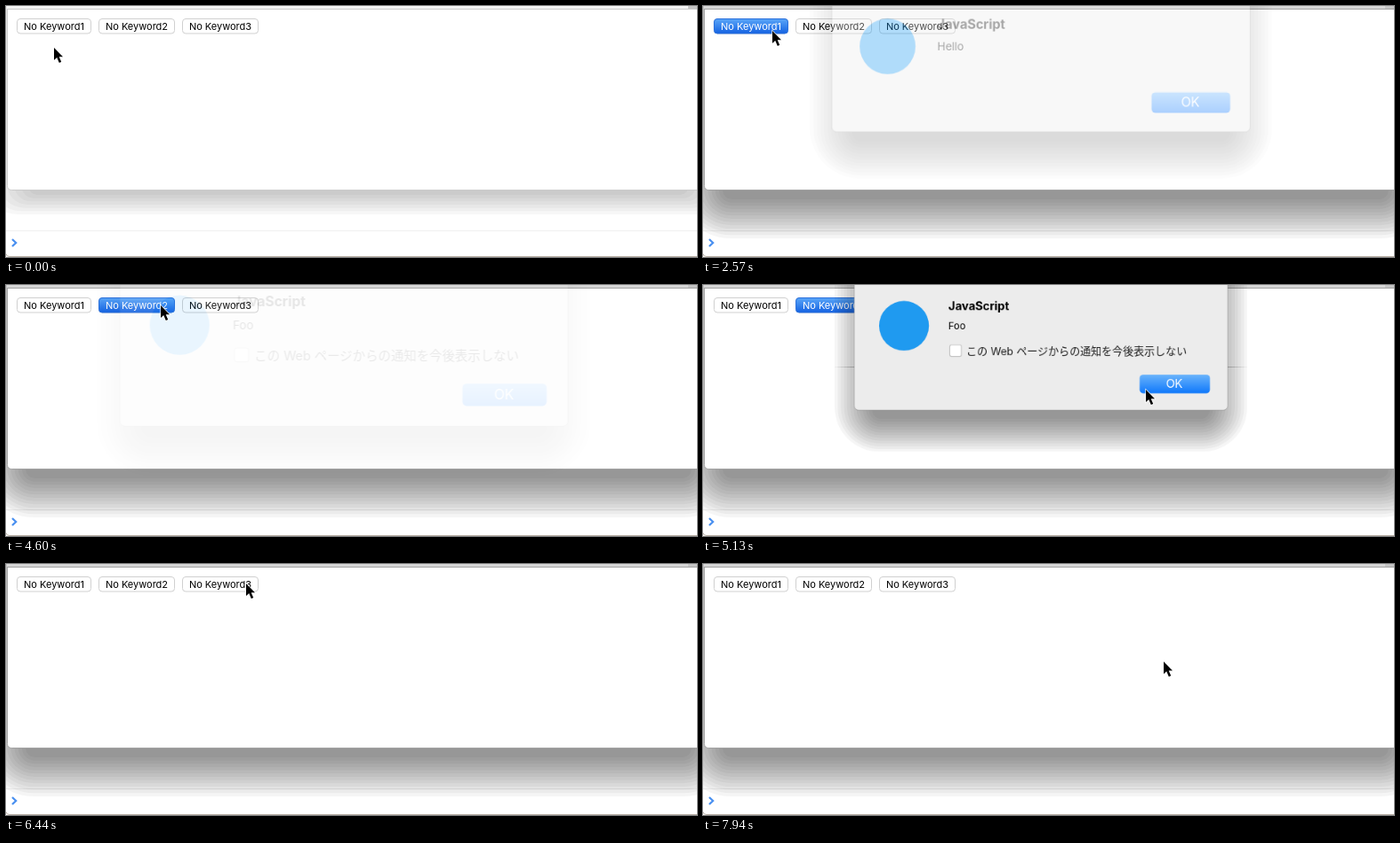
Animation of 777x283 px, one loop 8000 ms. Source, as an HTML page:

```html
<!DOCTYPE html>
<html lang="ja">
<head>
<meta charset="utf-8">
<title>Alert buttons</title>
<style>
  html, body { margin: 0; width: 100%; height: 100%; overflow: hidden; background: #fff; }
  svg { display: block; font: 11px Inter, "Noto Sans CJK JP", sans-serif; }
  .title { font-size: 13px; font-weight: 700; }
  .label { font-size: 12px; fill: #222; }
  .ok { font-size: 13px; fill: #fff; }
  .mid { text-anchor: middle; }
  .dialog { transform-origin: 380px 50px; }
</style>
</head>
<body>
<svg id="stage" width="777" height="283" viewBox="0 0 777 283"></svg>
<script>
const LOOP = 8000, TICK = 88;
const mix = (a, b, u) => a + (b - a) * u;
const smooth = u => u * u * (3 - 2 * u);

// Banded drop shadow: nested translucent rounded boxes.
function shadow(left, right, bottom, { layers, alpha, inset, spread, near, drop, radius }) {
  return Array.from({ length: layers }, (_, i) => {
    const u = i / (layers - 1);
    const dx = mix(inset, -spread, u);
    const base = bottom + mix(near, drop, u);
    return `<rect x="${left + dx}" y="-120" width="${right - left - 2 * dx}" height="${base + 120}"
      rx="${mix(10, radius, u)}" fill-opacity="${alpha}"/>`;
  }).join('');
}

const SHADOWS = {
  idle: { layers: 7, alpha: .033, inset: 24, spread: 24, near: 6, drop: 28, radius: 36 },
  active: { layers: 13, alpha: .039, inset: 21, spread: 30, near: 11, drop: 55, radius: 60 },
  dialog: { layers: 13, alpha: .039, inset: 20, spread: 22, near: 10, drop: 47, radius: 50 }
};

function browser(id, strip, edge) {
  return `<g id="${id}">
    ${shadow(1, 792, 207, SHADOWS[id])}
    <path d="M1.5 0V202.500Q1.500 207.500 6.500 207.500H780V0Z" fill="#fff" stroke="${edge}"/>
    <rect x="1" width="767" height="3" fill="${strip}"/>
    <rect x="767" width="10" height="3" fill="#c4c4c4"/>
    <rect x="1" y="3" width="776" height="1" fill="${edge}"/>
  </g>`;
}

const BUTTONS = [[12, 84], [104, 86], [198, 86]];

function button([x, width], index) {
  const face = (fill, edge, ink) => `
    <rect x="${x + .5}" y="14.500" width="${width - 1}" height="16.500" rx="3.500" fill="${fill}" stroke="${edge}"/>
    <text class="mid" x="${x + width / 2}" y="27" fill="${ink}">No Keyword${index + 1}</text>`;
  return face('#fff', '#d0d0d0', '#000') +
    `<g id="press${index}">${face('url(#pressed)', '#2a70dc', '#fff')}</g>`;
}

function dialog({ message, bottom, checkbox }, index) {
  const okTop = bottom - 40;
  const option = `<rect x="277.500" y="67.500" width="13" height="13" rx="2" fill="#fff" stroke="#c4c4c4"/>
    <text class="label" x="296" y="79">この Web ページからの通知を今後表示しない</text>`;
  return `<g class="dialog" id="dialog${index}">
    ${shadow(170, 590, bottom, SHADOWS.dialog)}
    <rect x="170" y="-41" width="420" height="${bottom + 41}" rx="5" fill="#ececec" stroke="#000" stroke-opacity=".22" stroke-width=".8"/>
    <circle cx="226" cy="46" r="28" fill="#1f9af0"/>
    <text class="title" x="276" y="28">JavaScript</text>
    <text x="276" y="50">${message}</text>
    ${checkbox ? option : ''}
    <rect x="491" y="${okTop}" width="79" height="21" rx="4" fill="url(#accent)"/>
    <text class="ok mid" x="530" y="${okTop + 15}">OK</text>
  </g>`;
}

const ALERTS = [
  { message: 'Hello', bottom: 132, press: 2230, open: 2400, close: 3280 },
  { message: 'Foo', bottom: 141, press: 4340, open: 4520, close: 5400, checkbox: true },
  { message: 'Bar', bottom: 141, press: 6530, open: 6700, close: 7590, checkbox: true }
];

const gradient = (id, top, bottom) => `<linearGradient id="${id}" x2="0" y2="1">
  <stop stop-color="${top}"/><stop offset="1" stop-color="${bottom}"/></linearGradient>`;

document.getElementById('stage').innerHTML = `
  <defs>${gradient('pressed', '#5aa6f8', '#1462e2')}${gradient('accent', '#6ab4fb', '#0f78fb')}</defs>
  <rect width="777" height="283" fill="#fff"/>
  ${browser('idle', '#f5f5f5', '#cbcbcb')}
  ${browser('active', '#d6d6d6', '#a2a2a2')}
  <rect y="253" width="777" height="1" fill-opacity=".06"/>
  <path d="M7 263l4.200 4-4.200 4" fill="none" stroke="#4a90f0" stroke-width="2.200"/>
  <path d="M0 279.500Q.5 282.500 4 282.500H777" fill="none" stroke="#b8afa5"/>
  ${BUTTONS.map(button).join('')}
  ${ALERTS.map(dialog).join('')}
  <path id="cursor" d="M0 0V14L3.200 11 5.800 17 8.200 16 5.700 10.200H10Z" stroke="#fff" stroke-width="1.200" paint-order="stroke"/>`;

// Holds each value until the next listed time.
function play(id, steps) {
  const frames = steps.map(([time, style]) => ({ offset: time / LOOP, easing: 'step-end', ...style }));
  document.getElementById(id).animate(frames, { duration: LOOP, iterations: Infinity });
}

const show = opacity => ({ opacity });

function span(id, from, to) {
  play(id, [[0, show(0)], [from, show(1)], [to, show(0)]]);
}

play('idle', [[0, show(1)], [1700, show(0)]]);
play('active', [[0, show(0)], [1700, show(1)]]);

const POP = [[1.2, .1], [1.12, .35], [1.06, .65], [1.02, .87], [1, 1]];
ALERTS.forEach(({ press, open, close }, i) => {
  span(`press${i}`, press, close + 90);
  play(`dialog${i}`, [
    [0, { opacity: 0, transform: 'scale(1)' }],
    ...POP.map(([scale, opacity], k) => [open + 90 * k, { opacity, transform: `scale(${scale})` }]),
    [close, { opacity: .5, transform: 'scale(1)' }],
    [close + 90, { opacity: 0, transform: 'scale(1)' }]
  ]);
});

// Pointer moves: start, end, x, y.
const MOVES = [
  [0, 260, 57, 31], [350, 530, 58, 25],
  [2400, 3100, 534, 101], [3370, 4070, 182, 24], [4070, 4160, 174, 23],
  [4520, 5130, 498, 118], [5130, 5310, 505, 116],
  [5400, 6180, 273, 24], [6180, 6440, 270, 22],
  [6700, 7060, 486, 101], [7060, 7500, 524, 113], [7590, 7940, 518, 110]
];

const place = (x, y) => ({ transform: `translate(${x}px, ${y}px)` });
let [px, py] = [54, 47];
const path = [[0, place(px, py)]];
for (const [start, end, x, y] of MOVES) {
  const count = Math.max(1, Math.round((end - start) / TICK));
  for (let i = 1; i <= count; i++) {
    const u = smooth(i / count);
    path.push([mix(start, end, i / count), place(Math.round(mix(px, x, u)), Math.round(mix(py, y, u)))]);
  }
  [px, py] = [x, y];
}
play('cursor', path);
</script>
</body>
</html>
```
